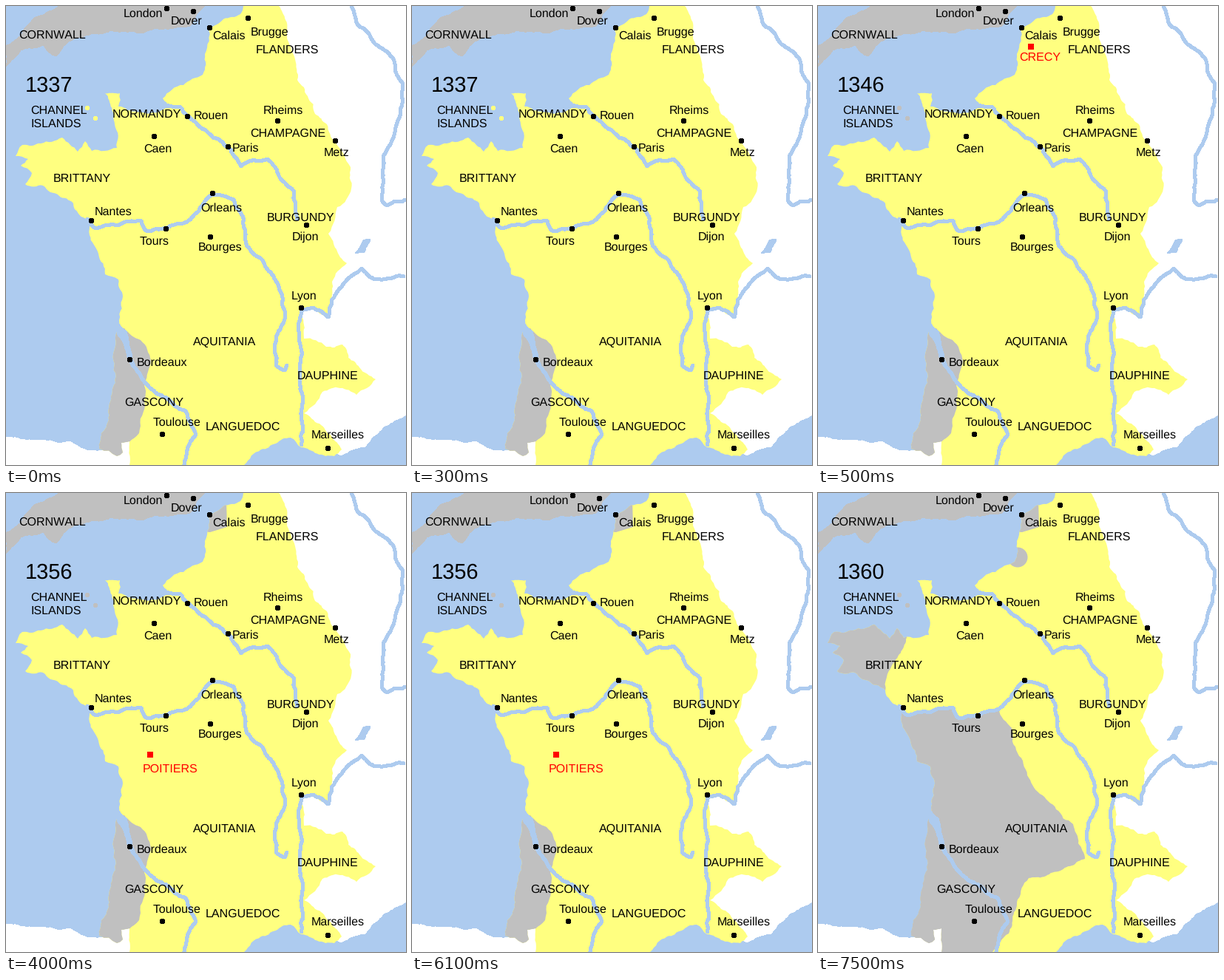
A matplotlib script for the animation above (8000 ms loop, 541 by 621 pixels).

```python
import math
import random

import matplotlib.pyplot as plt
from matplotlib.animation import FuncAnimation
from matplotlib.patches import Circle, Polygon, Rectangle

W, H, DPI = 541, 621, 100
SEA, FRENCH, ENGLISH, RED = "#adcbef", "#ffff80", "#c0c0c0", "#ff0000"
PX = 72 / DPI

plt.rcParams.update({
    "font.family": "Liberation Sans",
    "text.hinting": "none",
    "text.hinting_factor": 1,
    "toolbar": "None",
})
rng = random.Random(1337)

fig = plt.figure(figsize=(W / DPI, H / DPI), dpi=DPI, facecolor=SEA)
ax = fig.add_axes([0, 0, 1, 1])
ax.set(xlim=(0, W), ylim=(H, 0))
ax.axis("off")


def split(a, b, amount):
    """Points from a up to b, shifted sideways at every halving."""
    dx, dy = b[0] - a[0], b[1] - a[1]
    size = math.hypot(dx, dy)
    if size < 5 or size > 120:
        return [a]
    k = rng.uniform(-amount, amount)
    mid = ((a[0] + b[0]) / 2 - k * dy, (a[1] + b[1]) / 2 + k * dx)
    return split(a, mid, amount) + split(mid, b, amount)


def wander(points, amount=0.1):
    """Turn a few key points into a natural-looking line."""
    line = []
    for a, b in zip(points, points[1:]):
        line += split(a, b, amount)
    return line + [points[-1]]


def area(points, color, z=1):
    patch = Polygon(wander(points + points[:1]), fc=color, lw=0, zorder=z,
                    aa=False)
    return ax.add_patch(patch)


def river(line, width=4):
    xs, ys = zip(*line)
    ax.plot(xs, ys, color=SEA, lw=width * PX, zorder=4, aa=False,
            solid_joinstyle="round", solid_capstyle="round")


def label(text, x, y, size=16, color="black"):
    return ax.text(x - 0.5, y, text, size=size * PX, color=color,
                   ha="left", va="baseline", zorder=6)


def town(name, x, y, dot_x, dot_y):
    label(name, x, y)
    ax.add_patch(Circle((dot_x + 0.5, dot_y + 0.5), 3.5, fc="black", lw=0,
                        zorder=5, aa=False))


def battle(name, text_x, text_y, x, y):
    mark = Rectangle((x, y), 8, 8, fc=RED, lw=0, zorder=5, aa=False)
    return [ax.add_patch(mark), label(name, text_x, text_y, color=RED)]


# Neighbouring lands
area([(369, 0), (541, 0), (541, 553), (505, 575), (486, 596), (453, 608),
      (398, 590), (385, 420), (350, 200)], "white")
area([(0, 584), (50, 587), (88, 590), (101, 598), (132, 601), (180, 580),
      (180, 621), (0, 621)], "white")
area([(72, 0), (38, 16), (20, 40), (0, 54), (0, 82), (20, 60), (50, 53),
      (68, 68), (78, 54), (108, 40), (142, 33), (221, 31), (251, 25),
      (269, 0)], ENGLISH)

# France: one outline that also trims every territory inside it
north = [(13, 203), (22, 188), (47, 186), (76, 178), (97, 197), (107, 183),
         (116, 196), (133, 196), (150, 192), (147, 160), (134, 118),
         (154, 118), (152, 136), (205, 144), (220, 138), (212, 125),
         (240, 107), (266, 93), (269, 65), (273, 29), (317, 11), (321, 0)]
east = [(369, 0), (380, 40), (391, 72), (394, 100), (408, 122), (418, 146),
        (434, 160), (446, 185), (466, 218), (467, 247), (448, 272),
        (436, 308), (461, 348), (441, 373), (441, 398), (436, 421),
        (416, 408), (401, 411), (403, 450)]
dauphine = [(433, 461), (455, 458), (478, 489), (500, 505), (474, 526),
            (452, 517), (428, 522), (403, 551)]
south = [(424, 565), (454, 600), (444, 609), (399, 597), (385, 584),
         (345, 600), (322, 621), (167, 621), (167, 589), (156, 591),
         (158, 604), (150, 609), (126, 599)]
west = [(139, 560), (148, 510), (150, 441), (158, 441), (153, 425),
        (158, 393), (152, 370), (134, 363), (125, 335), (113, 310),
        (114, 292), (98, 281), (91, 267), (72, 257), (50, 243), (26, 241),
        (35, 226), (20, 216), (30, 207), (13, 203)]
france = Polygon(wander(north + east + dauphine + south + west, 0.12),
                 fc="none", lw=0)
ax.add_patch(france)


def territory(patch):
    patch.set(lw=0, zorder=3)
    ax.add_patch(patch)
    patch.set_clip_path(france)
    return patch


def english(points):
    return territory(Polygon(points, fc=ENGLISH))


territory(Rectangle((0, 0), W, H, fc=FRENCH))
islands = [ax.add_patch(Circle(c, 2.8, fc=FRENCH, lw=0, aa=False))
           for c in ((110, 138), (121, 152))]

loire_west = wander([(110, 288), (122, 301), (150, 297), (183, 291),
                     (191, 305), (216, 301), (245, 292)])
loire_east = wander([(245, 292), (261, 277), (280, 255), (308, 262),
                     (322, 300), (326, 325), (345, 342), (369, 380),
                     (378, 416), (364, 466), (366, 487), (377, 493),
                     (380, 486)])

english(wander([(140, 430), (160, 436), (182, 452), (196, 480), (187, 510),
                (188, 540), (180, 578), (166, 592), (150, 621), (110, 610)]))
calais = english([(262, 10), (298, 10), (299, 46), (276, 53), (262, 52)])
aquitaine = wander([(245, 292), (262, 318), (270, 352), (283, 382),
                    (300, 407), (322, 428), (345, 448), (352, 474),
                    (361, 495), (325, 512), (285, 521), (270, 550),
                    (258, 596), (236, 621)])
ceded = [
    english(loire_west + aquitaine + [(100, 621), (100, 300)]),
    english(wander([(119, 170), (119, 198), (100, 233), (91, 268), (0, 280),
                    (0, 170)])),
    territory(Circle((270, 87), 13.5, fc=ENGLISH)),
]

# Water
river(loire_west)
river(loire_east)
seine = [(214, 134), (236, 137), (257, 158), (280, 178), (304, 194),
         (318, 217), (354, 207), (367, 225), (389, 250), (394, 289)]
garonne = [(165, 462), (176, 491), (191, 512), (217, 530), (243, 548),
           (257, 580), (240, 623)]
rhone = [(538, 366), (497, 369), (481, 355), (458, 374), (441, 397),
         (436, 421), (416, 408), (401, 411), (401, 470), (397, 510),
         (400, 545), (400, 594)]
rhine = [(467, -2), (500, 52), (523, 70), (537, 105), (533, 140), (524, 178),
         (510, 218), (508, 263), (515, 270), (543, 262)]
for course in (seine, garonne, rhone, rhine):
    river(wander(course))
area([(150, 428), (163, 440), (175, 490), (161, 464)], SEA, 4)
area([(472, 334), (483, 317), (493, 316), (484, 334)], SEA, 4)

# Names
for entry in [
    ("London", 159, 15, 217, 3), ("Dover", 223, 25, 253, 7),
    ("Calais", 280, 45, 275, 29), ("Brugge", 331, 40, 327, 16),
    ("Rouen", 254, 153, 245, 149), ("Rheims", 348, 146, 367, 155),
    ("Metz", 430, 203, 445, 182), ("Caen", 187, 198, 200, 176),
    ("Paris", 306, 197, 300, 190), ("Nantes", 120, 283, 115, 290),
    ("Orleans", 264, 278, 279, 253), ("Dijon", 387, 317, 406, 296),
    ("Tours", 181, 323, 216, 301), ("Bourges", 260, 331, 276, 312),
    ("Lyon", 386, 397, 399, 408), ("Bordeaux", 177, 487, 167, 478),
    ("Toulouse", 199, 568, 211, 579), ("Marseilles", 413, 585, 435, 598),
]:
    town(*entry)
for entry in [
    ("CORNWALL", 18, 44), ("FLANDERS", 338, 64), ("CHANNEL", 34, 146),
    ("ISLANDS", 34, 164), ("NORMANDY", 144, 151), ("CHAMPAGNE", 331, 177),
    ("BRITTANY", 64, 238), ("BURGUNDY", 353, 291), ("AQUITANIA", 253, 459),
    ("DAUPHINE", 394, 505), ("GASCONY", 161, 541), ("LANGUEDOC", 270, 574),
]:
    label(*entry)
year = label("", 26, 116, size=29.33)
crecy = battle("CRECY", 273, 74, 284, 51)
poitiers = battle("POITIERS", 185, 378, 191, 350)


def draw(i):
    stage = (i >= 1) + (i >= 8) + (i >= 15)
    year.set_text(("1337", "1346", "1356", "1360")[stage])
    for isle in islands:
        isle.set_facecolor(ENGLISH if stage else FRENCH)
    calais.set_visible(stage >= 2)
    for land in ceded:
        land.set_visible(stage == 3)
    for part in crecy:
        part.set_visible(stage == 1)
    for part in poitiers:
        part.set_visible(stage == 2)
    return []


anim = FuncAnimation(fig, draw, frames=16, interval=500, init_func=lambda: [],
                     repeat=True, repeat_delay=0, blit=False)
plt.show()
```
